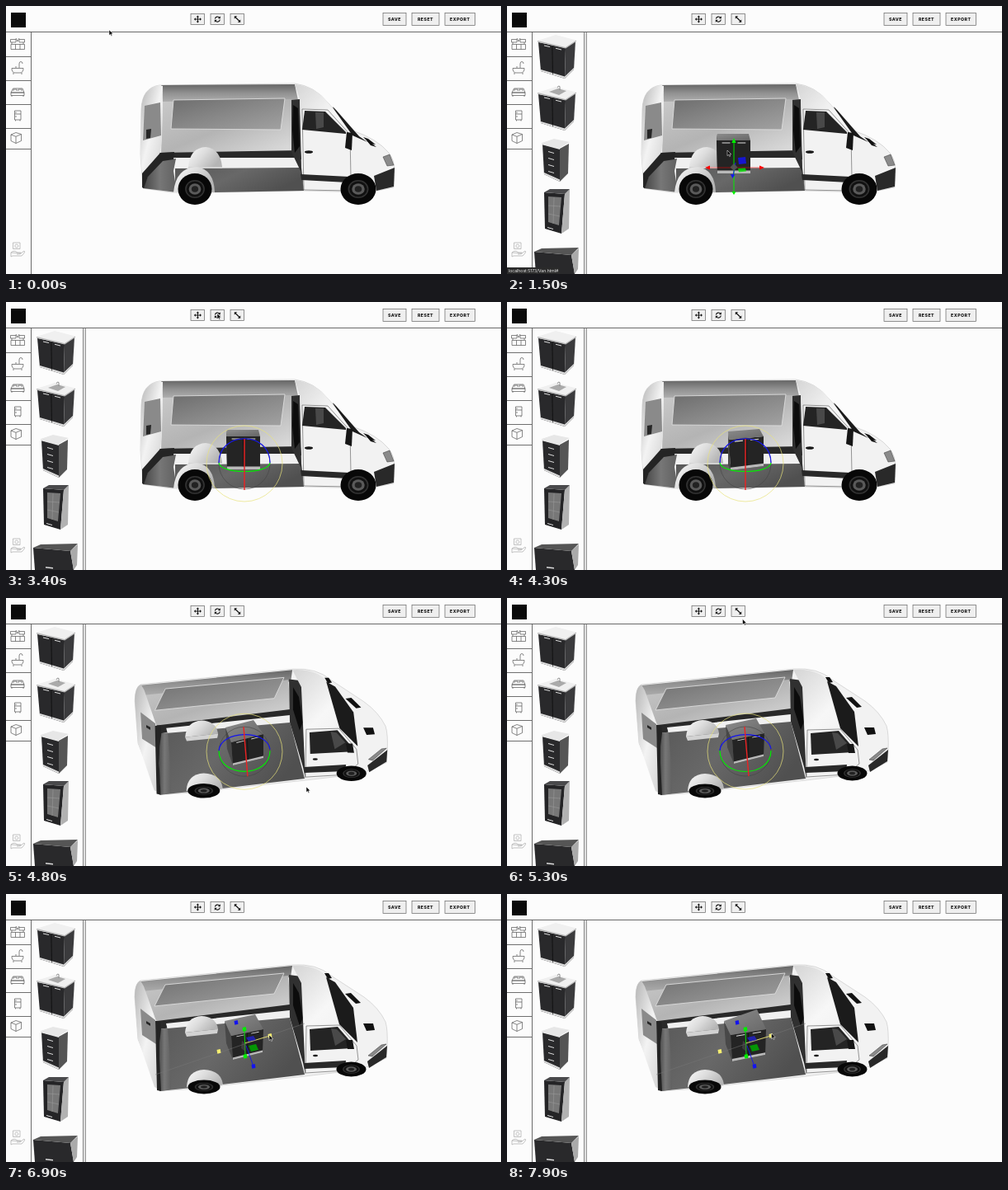
These frames come from a looping animation (600 px wide and 325 px high, 8000 ms). An HTML page:

```html
<!DOCTYPE html>
<html lang="en">
<head>
<meta charset="utf-8">
<title>Van configurator</title>
<style>
  html, body { margin: 0; width: 100%; height: 100%; overflow: hidden; background: #fcfcfc; }
  svg { display: block; width: 600px; height: 325px; }
  text { font-family: Inter, "Liberation Sans", sans-serif; }
  .label { font-size: 5.2px; font-weight: 800; letter-spacing: .5px; text-anchor: middle; fill: #111; }
  .icon { fill: none; stroke: #555; stroke-width: .7; stroke-linejoin: round; }
</style>
</head>
<body>
<svg id="stage" viewBox="0 0 600 325">
  <defs id="defs"></defs>
  <g id="van"></g>
  <g id="cabinet"></g>
  <g id="move"></g>
  <g id="rotate"></g>
  <g id="scale"></g>
  <g id="chrome"></g>
  <g id="panel"></g>
  <g id="status">
    <path d="M0 317H62Q64 317 64 319V325H0Z" fill="#2b2b2b"/>
    <text x="2" y="323" font-size="5.1" fill="#eee">localhost:5173/Van.html#</text>
  </g>
  <path id="cursor" d="M0 0V6.6L1.6 5.2L2.7 7.6L3.7 7.1L2.7 4.8H4.8Z" fill="#000" stroke="#fff" stroke-width=".5"/>
</svg>
<script>
const LOOP = 8000;
const $ = id => document.getElementById(id);

function add(parent, tag, attrs, text) {
  const el = document.createElementNS('http://www.w3.org/2000/svg', tag);
  for (const k in attrs) el.setAttribute(k, attrs[k]);
  if (text) el.textContent = text;
  $(parent).appendChild(el);
  return el;
}
const path = (parent, d, fill, more) => add(parent, 'path', { d, fill, ...more });
const line = (parent, d, stroke = '#555', w = .8) =>
  path(parent, d, 'none', { stroke, 'stroke-width': w });
const cube = (parent, x, y, fill, s = 5) =>
  path(parent, `M${x - s / 2} ${y - s / 2 + .6}l${s - .8} -1l.8 ${s - .4}l${.8 - s} 1Z`, fill);
const oval = (x, y, rx, ry) =>
  `M${x - rx} ${y}a${rx} ${ry} 0 1 0 ${2 * rx} 0a${rx} ${ry} 0 1 0 ${-2 * rx} 0Z`;

function gradient(id, x2, y2, ...stops) {
  const g = add('defs', 'linearGradient', { id, x1: 0, y1: 0, x2, y2 });
  g.innerHTML = stops.map((c, i) =>
    `<stop offset="${i / (stops.length - 1)}" stop-color="${c}"/>`).join('');
}
gradient('roof', 0, 1, '#666', '#929292', '#b0b0b0');
gradient('wall', 1, 1, '#c9c9c9', '#b4b4b4', '#dedede');
gradient('glass', 1, 1, '#6d6d6d', '#888', '#a2a2a2');
gradient('floor', 1, .4, '#585858', '#686868', '#505050');
gradient('rear', 1, 1, '#b5b5b5', '#f3f3f3', '#d2d2d2');
gradient('low', 1, 0, '#444', '#777', '#606060');
gradient('arch', 1, .5, '#fafafa', '#ddd', '#b5b5b5');
gradient('cab', .6, 1, '#d5d5d5', '#f7f7f7', '#eee');
gradient('top', 1, 1, '#8c8c8c', '#666');

// Shapes that follow the camera: side view to raised view.
const morphs = [];
function morph(parent, fill, a, b, more) {
  morphs.push({ el: path(parent, a, fill, more), a, b: b.match(/-?[\d.]+/g).map(Number) });
}
// Numbers stay unpadded: arc flags must be a bare 0 or 1.
function blend(a, b, t) {
  let i = 0;
  return a.replace(/-?[\d.]+/g, n => +(+n + (b[i++] - n) * t).toFixed(2));
}
const van = (...args) => morph('van', ...args);

van('#f2f2f2',
  'M186 96L350 94Q374 97 390 117L420 151Q450 161 464 178Q471 187 471 200L470 220L440 226L360 224L250 226L200 226L166 221L163 180L164 125Q165 99 186 96Z',
  'M163 105L347 86Q377 84 394 99L434 125Q452 138 460 155Q463 165 462 185L461 199L430 213L362 221L262 232L230 236L186 239L160 176L156 125Q156 108 163 105Z',
  { stroke: '#bbb', 'stroke-width': .5 });
van('url(#roof)', 'M188 96L350 95L354 114L346 114L190 117Z', 'M163 106L347 87L345 101L336 102L166 121Z');
van('url(#wall)', 'M190 116L346 113L346 178L188 179Z', 'M165 118L342 99L345 136L183 156Z');
van('url(#glass)', 'M203 114L338 112L333 150L200 149Z', 'M193 110L337 96L325 121L180 136Z',
  { stroke: '#ddd', 'stroke-width': .9, 'stroke-linejoin': 'round' });
van('#292929', 'M186 178L357 175L358 186L186 187Z', 'M183 154L344 134L345 143L185 164Z');
van('#f0f0f0', 'M203 184L356 184L358 197L203 198Z', 'M194 157L344 141L345 152L196 165Z');
van('url(#floor)', 'M205 197L357 196L361 224L250 226L205 226Z', 'M184 164L344 150L362 219L262 231L186 239Z');
van('url(#low)', 'M189 187L206 185L203 200L207 226L166 221L172 206Z', 'M184 164L196 163L198 190L200 237L187 239L186 200Z');
van('url(#rear)',
  'M186 96L190 97L189 160L187 178L165 203L163 180L164 125Q165 99 186 96Z',
  'M163 105L167 112L182 154L187 238L180 234L160 176L156 125Q156 108 163 105Z');
van('#8a8a8a', 'M168 121L187 117L188 157L166 163Z', 'M163 139L181 153L182 182L165 171Z');
van('#262626', 'M170 150L176 149L175 160L170 161Z', 'M170 154L175 157L175 160L170 157Z');
van('#242424', 'M165 203L187 178L204 177L203 186L190 188L172 207L167 221L165 220Z',
  'M181 154L183 154L187 154L188 164L186 180L186 200L188 239L183 238Z');
van('url(#arch)', 'M221 195Q223 172 242 171Q260 173 262 195Z', 'M217 168Q219 149 237 148Q255 149 257 164Z');
van('#d2d2d2', 'M221 195L262 195L262 197L221 197Z', 'M217 168L257 164L256 169L219 173Z');
van('url(#arch)', 'M203 226Q206 196 231 195Q252 198 253 226L249 226L210 226Z', 'M219 234Q220 214 240 213Q261 214 263 231L258 233L225 236Z');
van('#303030', 'M346 114L356 113L358 196L361 224L357 200L346 177Z', 'M343 98L358 100L362 155L363 219L360 205L344 150Z');
van('#0c0c0c', 'M348 120L354 124L356 170L350 178L347 150Z', 'M348 108L355 120L360 150L356 160L348 135Z');
van('url(#cab)',
  'M350 95Q374 97 390 117L416 152L418 222L361 224L356 113Z',
  'M347 87Q377 85 390 102L404 158L427 200L363 220L358 108Z');
van('#1b1b1b', 'M396 123L400 126L428 158L438 165L420 157Z', 'M388 101L399 107L421 138L430 160L424 181L404 158Z'
  .replace('L430 160L424 181', 'L426 180'));
van('#111', 'M396 122L398 124L400 126L397 124Z', 'M386 96L391 96L395 102L390 103Z');
van('#111', 'M433 159L439 161L448 168L441 167Z', 'M411 121L418 120L430 132L424 133Z');
van('#111', 'M437 163L440 164L449 171L442 169Z', 'M433 157L445 157L447 165L437 166Z');
van('#f2f2f2',
  'M359 125L390 126L417 156L418 208L414 224L361 223Z',
  'M364 160L404 159L425 184L427 201L411 214L363 217Z',
  { stroke: '#555', 'stroke-width': .6 });
van('#242424', 'M362 127L387 128L412 153L412 155L359 150Z', 'M368 164L402 161L421 183L420 187L369 190Z');
van('#777', 'M375 129L385 129L385 147L376 149Z', 'M394 163L401 164L412 176L399 184Z', { opacity: .45 });
van('#292929', 'M357 204L416 207L414 214L358 211Z', 'M362 205L412 202L411 210L362 212Z');
van('#292929', 'M446 206L471 196L470 219L449 224Z', 'M438 203L462 184L461 198L440 211Z');
van('#8a8a8a', 'M457 183L465 180L470 193L462 194Z', 'M439 196L455 183L461 182L444 197Z', { stroke: '#333', 'stroke-width': .5 });
van('#161616', 'M413 153L420 154L419 175L411 172Z', 'M412 177L420 177L422 188L414 188Z');
van('#161616', oval(367, 177, 5, 1.8), oval(375, 196, 3, 1.2));

function wheel(a, b) {
  [['#080808', 1], ['#333', .58], ['#111', .5], ['#5a5a5a', .36], ['#222', .2]].forEach(([fill, k]) =>
    van(fill, oval(a[0], a[1], a[2] * k, a[3] * k), oval(b[0], b[1], b[2] * k, b[3] * k)));
}
wheel([229, 222, 20.5, 19], [240, 234, 19.5, 8.5]);
wheel([427, 222, 21.5, 19], [418.5, 212.5, 18, 9]);

// Cabinet corners: four on top (from back left), then front right, front left and back left below.
const P1 = [255, 155, 293, 155, 295, 163, 254, 163, 295, 203, 255, 203, 255, 203];
const P2 = P1.map((n, i) => i % 2 ? n : n + 13);
const P3 = [268, 157, 306, 154, 311, 163, 269, 167, 311, 199, 271, 204, 268, 198];
const P4 = [266, 157, 300, 148, 312, 165, 273, 175, 312, 194, 275, 203, 268, 183];
const P5 = [265, 154, 302, 146, 312, 164, 273, 172, 311, 192, 275, 201, 267, 181];
const P6 = [263, 154, 303, 140, 314, 164, 271, 171, 313, 195, 273, 203, 265, 182];
const poses = [[1100, P1], [1750, P1], [2150, P2], [3900, P2], [4250, P3], [4300, P3],
  [4650, P4], [4800, P4], [5000, P5], [7100, P5], [7900, P6]];

const parts = ['#484848', '#242424', '#b9b9b9', 'url(#top)', '#101010', '#ddd', '#ddd']
  .map(fill => path('cabinet', '', fill));

function drawCabinet(p) {
  const pt = i => [p[2 * i], p[2 * i + 1]];
  const [a, b, c, d, c2, d2, a2] = [0, 1, 2, 3, 4, 5, 6].map(pt);
  const mid = (m, n, t) => [m[0] + (n[0] - m[0]) * t, m[1] + (n[1] - m[1]) * t];
  const front = (u, v) => mid(mid(d, c, u), mid(d2, c2, u), v);
  const poly = (...pts) => 'M' + pts.map(q => q.map(n => n.toFixed(2)).join(' ')).join('L') + 'Z';
  const rect = (u, v, u2, v2) => poly(front(u, v), front(u2, v), front(u2, v2), front(u, v2));
  [poly(a, d, d2, a2), rect(0, 0, 1, 1), rect(0, .91, 1, 1), poly(a, b, c, d),
    rect(.49, .04, .51, .91), rect(.16, .06, .4, .09), rect(.62, .06, .86, .09)]
    .forEach((s, i) => parts[i].setAttribute('d', s));
}

// Move handles
const RED = '#f00', GREEN = '#0e0', BLUE = '#1414ee';
line('move', 'M245 196H307', RED, .5);
line('move', 'M275 226V165', GREEN, 1);
line('move', 'M277 190L274 206', BLUE, 1);
path('move', 'M240 196l6 -2.6v5.2Z', RED);
path('move', 'M312 196l-6 -2.6v5.2Z', RED);
path('move', 'M275 160l-2.7 6h5.4Z', GREEN);
path('move', 'M275 229l-2.5 -4h5Z', GREEN);
path('move', 'M273.4 209l-2.5 -5l5.4 .6Z', BLUE);
path('move', 'M280 184l9 -1l1 8l-9 1Z', BLUE, { opacity: .85 });
path('move', 'M280 197l9 -.5l1 4l-9 1Z', GREEN, { opacity: .75 });
path('move', 'M275 191l4.5 4.5l-4.5 4.5l-4.5 -4.5Z', '#555', { opacity: .9 });

// Rotate rings
const ring = (color, a, b, w = 1.2) =>
  morph('rotate', 'none', a, b, { stroke: color, 'stroke-width': w });
ring('#e8e27a', oval(289, 196, 46, 46), oval(289, 186, 46, 46), .7);
ring('#444', oval(289, 196, 31, 31), oval(289, 186, 31, 30), .6);
ring(BLUE, 'M258 195C258 156 320 156 320 195', 'M258 185C260 160 316 159 320 183');
ring(GREEN, 'M258 195C260 209 318 209 320 195', 'M258 185C258 219 320 219 320 185');
ring('#e22', 'M289 166L289 228', 'M288 156L293 216', 1.4);

// Scale handles
const axis = line('scale', 'M181 219L362 157', '#777', .5);
const rod = line('scale', 'M289 181L320 172', RED, .8);
line('scale', 'M289 164L290 197', GREEN, .9);
line('scale', 'M291 184L300 209', BLUE, .9);
path('scale', 'M291 174l9 -2l3 5l-9 2Z', '#22c', { opacity: .8 });
path('scale', 'M294 184l9 -2l3 7l-9 2Z', '#0a0', { opacity: .85 });
path('scale', 'M286 178l5 4l-1 9l-5 -4Z', '#555', { opacity: .5 });
const ends = [cube('scale', 258, 191, RED), cube('scale', 320, 172, RED)];
cube('scale', 289, 164, GREEN);
cube('scale', 290, 197, GREEN);
cube('scale', 279, 156, BLUE);
cube('scale', 300, 209, BLUE);

// Toolbar and sidebar
add('chrome', 'rect', { x: 6, y: 8, width: 18, height: 18, fill: '#0a0a0a' });
line('chrome', 'M0 31.5H600M30.5 31.5V325', '#444');
line('chrome', 'M0 61.5H30M0 90.5H30M0 119.5H30M0 148.5H30M0 173.5H30', '#333', .7);
const box = (x, y, w, h) =>
  add('chrome', 'rect', { x, y, width: w, height: h, fill: '#efefef', stroke: '#666', 'stroke-width': .7 });
[[457, 28, 'SAVE'], [492, 33, 'RESET'], [532, 36.5, 'EXPORT']].forEach(([x, w, name]) => {
  box(x, 8.5, w, 15);
  add('chrome', 'text', { x: x + w / 2, y: 17.7, class: 'label' }, name);
});
[224, 248, 272].forEach(x => box(x, 9.5, 16.5, 13));
line('chrome', 'M229 16H236M232.4 12.5V19.5', '#111', 1);
path('chrome', 'M227.8 16l2 -1.7v3.4ZM237 16l-2 -1.7v3.4ZM232.4 11.4l-1.7 2h3.4ZM232.4 20.6l-1.7 -2h3.4Z', '#111');
line('chrome', 'M253.4 15.5A3 3 0 0 1 258.6 14M259.3 16.5A3 3 0 0 1 254 18', '#111', 1.1);
path('chrome', 'M259.8 12.3v3h-3ZM252.8 19.8v-3h3Z', '#111');
line('chrome', 'M278 13.5L283 18.5', '#111', 1.1);
path('chrome', 'M276.8 12.2h3.4l-3.4 3.4ZM284.2 19.8h-3.4l3.4 -3.4Z', '#111');

const icon = (d, more) => add('chrome', 'path', { d, class: 'icon', ...more });
icon('M5.5 40.5H12V44H5.5ZM16 40.5H22.5V44H16ZM12 39L14 43L16 39M6 46.5H22.5V52.5H6ZM11.5 46.5V52.5M17 46.5V52.5M7 44V46M21 44V46');
icon('M7 75.5H21Q21 81 17 81H11Q7 81 7 75.5ZM16 75V70Q16 67.5 18 67.5Q20 67.5 20 70M9 81V83M19 81V83M12 73V75');
icon('M6 105L8.5 100H20L22 105ZM6 105H22V108.5H6ZM9 103V101H13V103M15 103V101H19V103M7 108.5V110M21 108.5V110');
icon('M10.5 127H18V138H10.5ZM10.5 131H18M12 128.5V130M12 133V135M11.5 138V139.5M17 138V139.5');
icon('M6 156L12 153.5L18.5 155.5V163.5L12 166.5L6 163.5ZM6 156L12 158.3L18.5 155.5M12 158.3V166.5');
icon('M8.5 287H17V294.5H8.5ZM12.8 289a2 2 0 1 0 .1 0M6 299Q10 295.5 14 299H18Q19 301 13 301M18 300L22 297Q24 298 19 303H8L6 304V299Z', { style: 'stroke:#aaa' });

// Catalogue
add('panel', 'rect', { x: 31, y: 32, width: 66, height: 293, fill: '#fcfcfc' });
line('panel', 'M93.6 32V325M96.2 32V325', '#555', .8);
const art = (d, fill) => path('panel', d, fill);
[0, 63].forEach(y => {
  const g = (d, fill) => art(d, fill).setAttribute('transform', `translate(0 ${y})`);
  g('M38 44L71 51L70 88L41 79Z', '#29292b');
  g('M71 51L83 43L81 77L70 88Z', '#3b3b3d');
  g('M41 77L70 85.5V88L41 79ZM70 85.5L81 75V77L70 88Z', '#ddd');
  g('M37 42L59 35L84 41.5L71 50Z', '#f0f0f0');
  g('M37 42L71 50L84 41.5V43L71 51.5L37 43.5Z', '#b8b8b8');
  g('M54.6 49L55 83L55.6 83L55.2 49Z', '#000');
  g('M45 47.5L52 49V50L45 48.5ZM59 50.8L66 52.5V53.5L59 51.8Z', '#ddd');
});
art('M51 104L62 100L72 103L63 108Z', '#aaa');
line('panel', 'M64 102V97.5Q62 96 61 99', '#777', .8);
art('M43 168L64 173L64 213L45 204Z', '#29292b');
art('M64 173L75 167L74 203L64 213Z', '#555');
art('M42 166L57 161L76 165L64 172V174L42 168Z', '#e7e7e7');
art('M45 202L64 210.5V213L45 204Z', '#ddd');
[176, 184, 192, 200].forEach(y => art(`M50 ${y}l7 2v1l-7 -2Z`, '#ddd'));
art('M45 226L70 228L66 276L46 270Z', '#242426');
art('M70 228L76 222L75 270L66 276Z', '#b2b2b2');
art('M45 226L52 222L76 222L70 228Z', '#4a4a4c');
art('M50 231L66 232L63 266L50 262Z', '#777');
line('panel', 'M50 242L65 243M50 252L64 255M57 232L56 264', '#999', .6);
art('M49 268l7 2v1l-7 -2Z', '#ddd');
art('M33 298L78 302L82 325H35Z', '#29292b');
art('M78 302L87 294L86 319L82 325Z', '#aaa');
art('M33 298L42 294L87 293L78 302Z', '#555');
art('M48 321L57 322V323.5L48 322.5Z', '#ddd');

// Timing
const view = [[4300, [0]], [4650, [.96]], [5000, [1]]];
const pointer = [[0, [125, 29]], [150, [125, 29]], [500, [14, 46]], [600, [14, 46]], [950, [60, 60]], [1100, [60, 60]],
  [1500, [267, 175]], [1700, [308, 195]], [1750, [308, 195]], [2150, [321, 195]], [2250, [321, 195]],
  [2500, [269.5, 76]], [2750, [257, 22]], [2850, [256, 14]], [3650, [256, 14]], [3900, [284, 202]],
  [4250, [292, 205]], [4300, [320, 195]], [4650, [363, 226]], [4800, [364, 229]], [5000, [366, 232]], [5350, [281, 14]],
  [5700, [281, 14]], [6000, [290, 44]], [6250, [284, 14]], [6450, [284, 14]], [6800, [319, 171]],
  [7100, [319, 171]], [7900, [320.5, 169]]];

function sample(keys, t) {
  const i = keys.findIndex(k => k[0] > t);
  if (i === 0) return keys[0][1];
  if (i < 0) return keys[keys.length - 1][1];
  const [t0, a] = keys[i - 1], [t1, b] = keys[i];
  const f = (t - t0) / (t1 - t0), e = f * f * (3 - 2 * f);
  return a.map((n, j) => n + (b[j] - n) * e);
}
const show = (id, on) => $(id).style.display = on ? '' : 'none';

let lastView = -1;
function render(t) {
  const [v] = sample(view, t);
  if (v !== lastView) morphs.forEach(m => m.el.setAttribute('d', blend(m.a, m.b, v)));
  lastView = v;

  const pose = sample(poses, t);
  drawCabinet(pose);
  show('cabinet', t >= 1100);
  show('move', t >= 1100 && t < 2900);
  show('rotate', t >= 2900 && t < 5450);
  show('scale', t >= 5450);
  $('move').setAttribute('transform', `translate(${pose[0] - P1[0]} 0)`);

  const active = t >= 6800;
  ends.forEach(el => el.setAttribute('fill', active ? '#f5ee70' : RED));
  rod.setAttribute('stroke', active ? '#f5ee70' : RED);
  axis.style.display = active ? '' : 'none';

  show('panel', t >= 550);
  show('status', t >= 1000 && t < 2100);
  show('cursor', t < 4200 || t >= 4400);
  $('cursor').setAttribute('transform', `translate(${sample(pointer, t).join(' ')})`);
}

const start = performance.now();
function tick() {
  render((performance.now() - start) % LOOP);
  requestAnimationFrame(tick);
}
tick();
</script>
</body>
</html>
```
